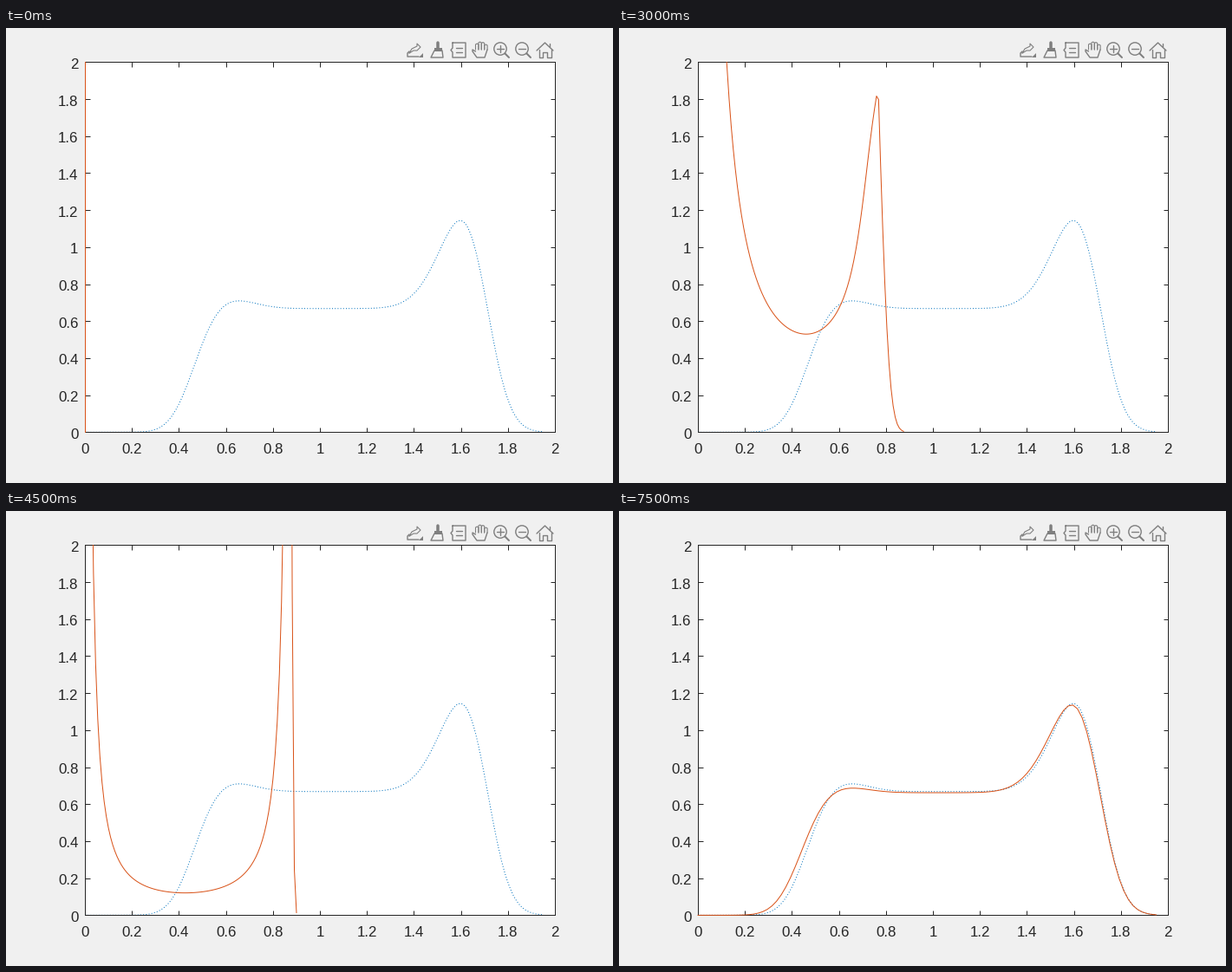
A matplotlib script that plays this animation: 700 by 525 pixels, repeating every 8 s.

```python
import math

import numpy as np
import matplotlib.pyplot as plt
from matplotlib.animation import FuncAnimation
from matplotlib.patches import Circle, Polygon
from matplotlib.transforms import Bbox, ScaledTranslation, TransformedBbox

W, H = 700, 525
PX = 0.72  # one pixel in points at 100 dpi
INK, GRAY = "#262626", "#7f7f7f"
BLUE, RED = "#0072BD", "#D95319"

plt.rcParams["font.family"] = "Liberation Sans"
erf = np.vectorize(math.erf)


def rise(x, mid, width):
    """Gaussian step from 0 to 1; a negative width falls instead."""
    return (1 + erf((x - mid) / (width * math.sqrt(2)))) / 2


def humps(x, *parts):
    return sum(a * np.exp(-((x - m) / s)**2 / 2) for m, a, s in parts)


def plateau(x, base, left, *parts):
    """Flat top with humps between a soft left and right edge."""
    return rise(x, *left) * rise(x, 1.72, -.085) * (base + humps(x, *parts))


def goal(x):
    return plateau(x, .668, (.46, .08), (.62, .05, .1), (1.66, .64, .128))


def grid(end):
    return np.linspace(0, end, 100)


def spike(k):
    """Narrow block at zero that widens eightfold per step."""
    e = .115 * 8.0**(k - 4)
    x = grid(1)
    return x * e, 1.38 / e * rise(x, .256, .044) * rise(x, .913, -.036)


def bowl(u):
    """Two power-law walls, thinning and steepening as u grows."""
    c1, c2, e = .093 * .33**u, .052 * .54**u, .82 + .04 * u
    cut, soft = .772 + .068 * u, .39**max(u, 0)
    x = grid(cut + .108 * soft)
    y = c1 * np.maximum(x, .03 * soft)**-1.4
    y += c2 * np.maximum(e - x, .05 * soft)**-1.4
    return x, y * rise(x, .02 * soft, .02 * soft) * rise(x, cut, -.036 * soft)


def settle():
    """Humps spread over the stage, then close in on the goal."""
    x = grid(1.06)
    yield x, humps(x, (0, 3, .06), (.5, .4, .25), (.95, 2.1, .045))
    x = grid(1.63)
    yield x, humps(x, (.035, 1.1, .12), (.47, .25, .14), (.81, .83, .165),
                   (1.232, .75, .122))
    x = grid(1.93)
    yield x, plateau(x, .63, (.48, .11), (1.46, .53, .13))
    x = grid(1.95)
    late = plateau(x, .645, (.482, .078), (.64, .06, .11), (1.46, .38, .117),
                   (1.72, .6, .09))
    yield x, late
    yield x, 1.02 * goal(x)**.8 * late**.2
    yield x, plateau(x, .662, (.437, .085), (.62, .03, .1), (1.65, .61, .133))


steps = [spike(k) for k in range(5)]
steps += [bowl(u) for u in np.linspace(-.6, 1.5, 5)]
steps += list(settle())

fig = plt.figure(figsize=(W / 100, H / 100), dpi=100, facecolor="#f0f0f0")
x0, x1, top, bottom = 91, 633, 39.3, 466.4
ax = fig.add_axes([x0 / W, 1 - bottom / H, (x1 - x0) / W, (bottom - top) / H])
ax.set(xlim=(0, 2), ylim=(0, 2))
ticks = np.arange(11) / 5
labels = [f"{t:g}" for t in ticks]
ax.set_xticks(ticks, labels)
ax.set_yticks(ticks, labels)
ax.tick_params(direction="in", top=True, right=True, length=5.5 * PX, width=PX,
               color=INK, labelcolor=INK, labelsize=12.2)
ax.tick_params(axis="x", pad=12.3 * PX)
ax.tick_params(axis="y", pad=7.5 * PX)
drop = ScaledTranslation(0, -.015, fig.dpi_scale_trans)
for label in ax.get_yticklabels():
    label.set_transform(label.get_transform() + drop)
for side in ax.spines.values():
    side.set(color=INK, linewidth=PX)

gx = np.linspace(0, 1.95, 400)
ax.plot(gx, goal(gx), color=BLUE, lw=PX, ls=(0, (1, 2.2)), dash_capstyle="butt",
        zorder=3)
curve, = ax.plot([], [], color=RED, lw=PX, zorder=4)
curve.set_clip_box(TransformedBbox(Bbox([[-.002, -.003], [1, 1.001]]), ax.transAxes))

# toolbar, drawn in pixel coordinates
bar = fig.add_axes([0, 0, 1, 1])
bar.set(xlim=(0, W), ylim=(H, 0))
bar.axis("off")


def stroke(*pts, w=1.4):
    bar.plot(*zip(*pts), color=GRAY, lw=w * PX, solid_capstyle="round",
             solid_joinstyle="round")


def fill(*pts):
    bar.add_patch(Polygon(pts, fc=GRAY, ec="none"))


def lens(x, y):
    bar.add_patch(Circle((x, y), 7.2, fill=False, ec=GRAY, lw=1.4 * PX))
    stroke((x + 5.3, y + 5.3), (x + 10, y + 10), w=2)
    stroke((x - 3.7, y), (x + 3.7, y))


# export
stroke((465, 27), (463, 29), (463, 33), (476, 33))
stroke((465, 29), (468, 24), (474, 21), (474, 18), (478, 22), (474, 26),
       (470, 26), (465, 29), w=1.1)
fill((481, 29), (481, 34), (476, 34))
# brush
stroke((498, 17), (498, 24), w=3.5)
fill((494, 23), (503, 23), (503, 27), (494, 27))
stroke((494, 26), (490, 34), (504, 34), (503, 26))
# data tip
stroke((515, 17), (530, 17), (530, 34), (515, 34), (515, 28), (513, 25.5),
       (515, 23), (515, 17))
for y in (23, 28):
    stroke((519, y), (526, y))
# hand
for i, tip in enumerate((19, 17, 17.5, 20)):
    x = 541.5 + 3.4 * i
    stroke((x, 25), (x, tip), (x + 1.7, tip - 1), (x + 3.4, tip), (x + 3.4, 25), w=1.1)
stroke((541.5, 27), (538, 25), (538, 27), (543, 34), (552, 34), (555, 25))
# zoom in and out
lens(570, 24)
stroke((570, 20.3), (570, 27.7))
lens(595, 24)
# home
stroke((612, 26), (621.5, 17), (631, 26))
stroke((614.5, 25), (614.5, 34), (619, 34), (619, 28), (624, 28), (624, 34),
       (628.5, 34), (628.5, 25))
stroke((627, 18), (627, 21))


def draw(i):
    curve.set_data(*steps[i])
    return curve,


anim = FuncAnimation(fig, draw, frames=len(steps), interval=500, repeat=True,
                     repeat_delay=0)
plt.show()
```
